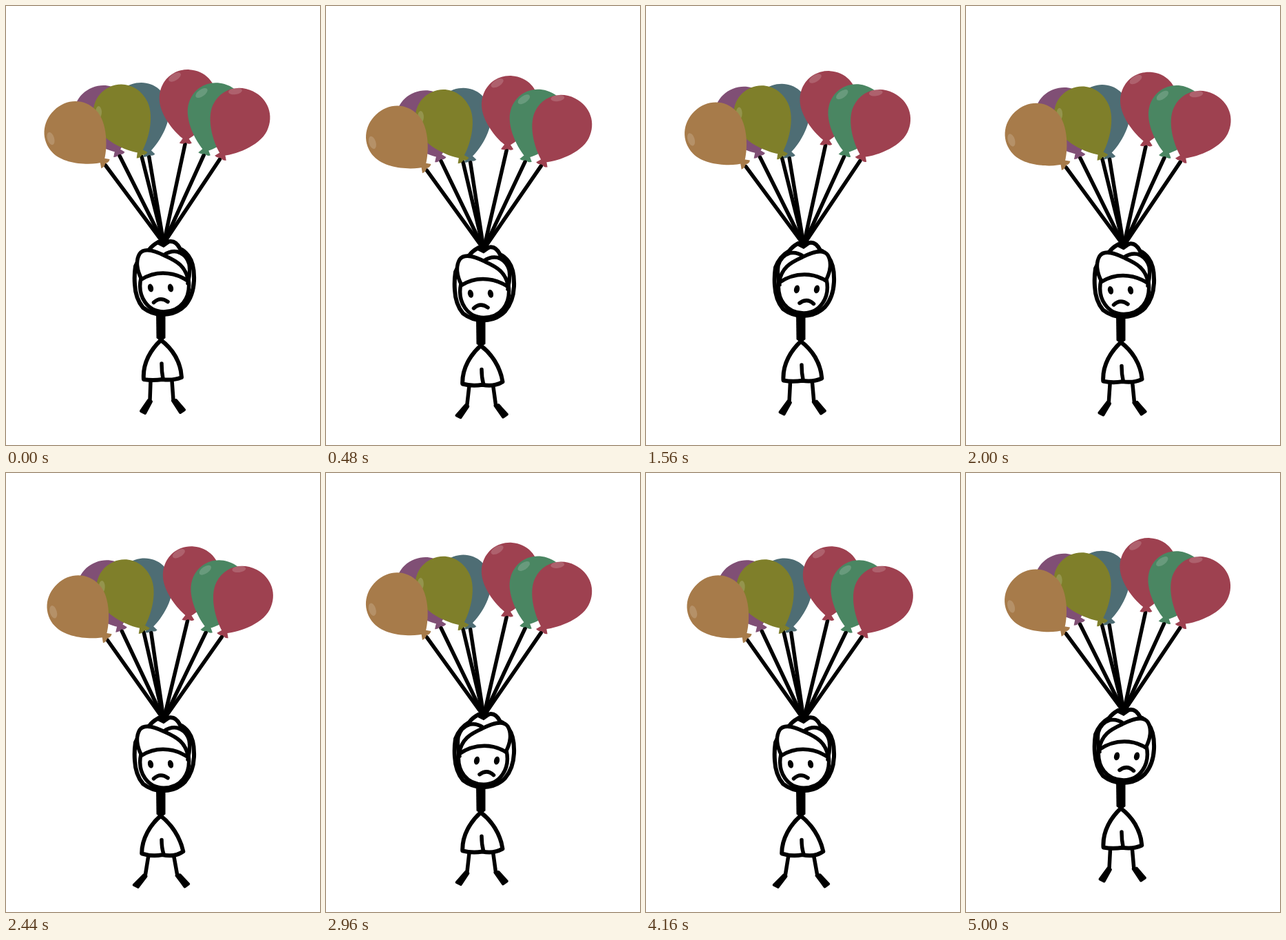
An HTML page for the animation above (5040 ms loop, 456 by 636 pixels).

```html
<!DOCTYPE html>
<html lang="en">
<head>
<meta charset="utf-8">
<title>Balloons</title>
<style>
  html, body { margin: 0; width: 100%; height: 100%; overflow: hidden; background: #fff; }
  svg { display: block; width: 456px; height: 636px; }
  .ink { fill: none; stroke: #000; stroke-width: 5.5; stroke-linecap: round; stroke-linejoin: round; }
  .bold { stroke-width: 6; }
  .paper { fill: #fff; }
</style>
</head>
<body>
<svg viewBox="0 0 456 636">
  <g id="legs">
    <path class="ink" id="shinL"/><path class="ink" id="shinR"/>
    <path class="ink" id="footL" style="fill: #000; stroke-width: 4"/>
    <path class="ink" id="footR" style="fill: #000; stroke-width: 4"/>
  </g>
  <path class="ink bold paper" id="dress"/>
  <path class="ink" id="fold"/>

  <g id="bunch"><g id="strings" class="ink"></g><g id="balloons"></g></g>

  <g id="top">
    <path d="M218 444H231.500V481L225 486L218.500 481Z"/>
    <path class="ink bold paper" d="M221 342Q212 347 208 353Q194 361 188 377Q186 390 187 403Q188 424 199 437Q212 447 228 447Q247 447 260 434Q272 420 273 398Q274 374 265 362Q259 354 253 352Q247 340 238 341Z"/>
    <g id="face">
      <path class="ink paper" d="M196 394C190 421 206 443 229 443C253 443 269 424 265 396"/>
      <path class="ink paper" d="M229 361Q239 354 249 356Q262 360 266 374Q268 386 264 402"/>
      <path class="ink paper" d="M197 396C190 383 188 369 194 359C201 349 217 355 231 362C249 370 261 377 265 399Q248 387 228 387Q211 387 197 396Z"/>
      <ellipse cx="210" cy="408.500" rx="4" ry="6" transform="rotate(-14 210 408.500)"/>
      <ellipse cx="239" cy="408.500" rx="4" ry="6" transform="rotate(-14 239 408.500)"/>
      <path class="ink" d="M214.500 429.500Q224 420.500 235 428.500"/>
    </g>
    <path d="M220 339L236 338L239 343L229 350L219 345Z"/>
  </g>
</svg>
<script>
const $ = id => document.getElementById(id);
const set = (id, name, value) => $(id).setAttribute(name, value);

const FRAME = 40, LOOP = 5040, BOB = 1720;
const KNOT = [229, 344];

// nozzle x, y, tilt, width, length, colour, highlight [x, y, rx, ry, tilt]
const balloons = [
  [163, 212, -22, 83, 101, '#804f75'],
  [207, 213, -10, 81, 103, '#4e6d74'],
  [196, 213, -26, 82, 106, '#7f7f2a', [134.5, 154, 4.5, 9, 0]],
  [142, 226, -44, 88, 104, '#a77b4a', [65, 192, 5, 9.5, -18]],
  [261, 195, 3, 83, 103, '#9e4150', [245, 103, 10, 5, -32]],
  [289, 211, 16, 84, 102, '#4a8662', [284, 126, 10, 5, -35]],
  [313, 217, 26, 87, 104, '#9e4150', [333, 123.5, 10, 4.5, -8]]
];

function body(w, h) {
  const side = s => [s * w * .18, -h * .08, s * w * .5, -h * .35, s * w * .5, -h * .59];
  const cap = s => [s * w * .5, -h * .83, s * w * .28, -h, 0, -h];
  const half = s => `M0 0C${side(s)}C${cap(s)}Z`;
  return half(-1) + half(1);
}

$('balloons').innerHTML = balloons.map(([x, y, tilt, w, h, color, shine]) => {
  const glow = shine
    ? `<ellipse rx="${shine[2]}" ry="${shine[3]}" fill="#fff" opacity=".17"
        transform="translate(${shine[0]} ${shine[1]}) rotate(${shine[4]})"/>` : '';
  return `<g fill="${color}"><g transform="translate(${x} ${y}) rotate(${tilt})">
    <path d="${body(w, h)}"/><path d="M-3 -5L-9 4Q-4 6 0 3Q5 6 9 3L3 -5Z"/></g>${glow}</g>`;
}).join('');

$('strings').innerHTML = balloons.map(([x, y]) =>
  `<path d="M${x + (KNOT[0] - x) * .03} ${y + 5}L${KNOT}"/>`).join('');

// Height of the bob: 0 at the top, 1 at the bottom
function bob(phase) {
  const u = phase / (BOB / 2);
  if (u < 1) return (1 - Math.cos(Math.PI * u)) / 2;
  const v = u - 1;
  return 1 - ((1 - Math.cos(Math.PI * v)) / 2 + v) / 2;
}

function draw(time) {
  const t = Math.floor(time % LOOP / FRAME) * FRAME;
  const phase = t % BOB, k = bob(phase), drop = 14.2 * k;
  const at = (x, y, dx, dy) => `${x + dx * k} ${y + dy * k}`;

  set('bunch', 'transform', `translate(0 ${drop}) rotate(${1.5 * k} ${KNOT})`);
  set('top', 'transform', `translate(0 ${drop})`);
  set('face', 'transform', phase < BOB / 2 ? '' : 'translate(458 0) scale(-1 1)');

  set('dress', 'd', `M${at(225, 484, -.5, 13.5)}
    C${at(211, 497, -1, 13)} ${at(198, 517, -1, 13)} ${at(200, 541, -3, 11)}
    Q${at(213, 543, -1, 14)} ${at(227, 541, 0, 13)}
    Q${at(243, 543, 2, 15)} ${at(255, 538, 2.5, 11)}
    C${at(254, 515, -1, 14)} ${at(241, 496, -1, 13)} ${at(225, 484, -.5, 13.5)}Z`);
  set('fold', 'd', `M${at(226, 518, 0, 14.5)}Q${at(226, 530, 0, 14)} ${at(228, 540, 1, 13)}`);

  set('shinL', 'd', `M${at(210, 543, -3.5, 13)}L${at(209, 571, -7, 11.5)}L${at(202, 582, -10, 11)}`);
  set('shinR', 'd', `M${at(241, 543, 3, 13)}L${at(243, 571, 6, 11.5)}L${at(251, 579, 6.5, 11.5)}`);
  set('footL', 'd', `M${at(207, 571, -7, 12)}L${at(211, 573, -8, 12)}
    L${at(202, 590, -11, 10.5)}L${at(196, 587, -11, 10.5)}Z`);
  set('footR', 'd', `M${at(242, 572, 6, 12)}L${at(247, 571, 6, 12)}
    L${at(259, 585, 6.5, 11)}L${at(253, 589, 7, 11)}Z`);
}

function tick() {
  draw(performance.now());
  requestAnimationFrame(tick);
}
draw(0);
tick();
</script>
</body>
</html>
```
